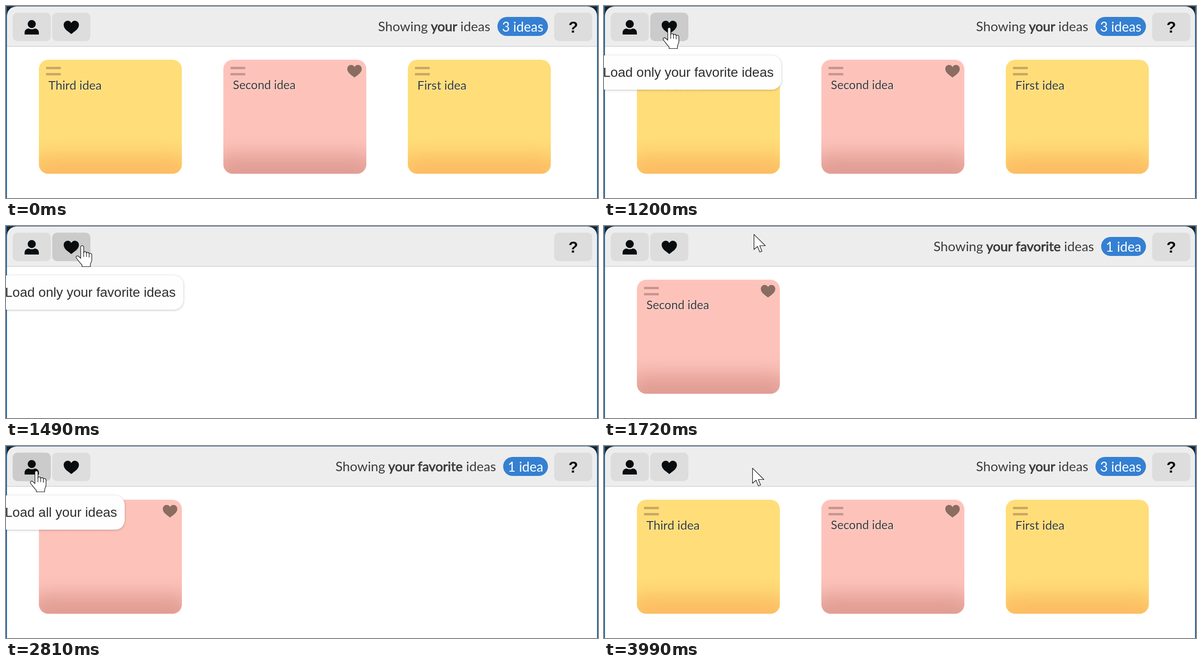
Animation of 1242x404 px, one loop 4.78 s. Source, as an HTML page:

```html
<!DOCTYPE html>
<html lang="en">
<head>
<meta charset="utf-8">
<title>Idea board</title>
<style>
  html, body { margin: 0; width: 100%; height: 100%; overflow: hidden; background: #fff; }
  #stage { position: absolute; left: 0; top: 0; width: 1242px; height: 404px; overflow: hidden;
    background: linear-gradient(#1b252b 0 60px, #fff 60px); font: 28px/40px Lato, sans-serif; color: #3b3b3b; }
  #stage *, #stage *::after { position: absolute; box-sizing: border-box; white-space: pre; }
  #stage b { position: static; }
  #frame, .view { inset: 0; }
  #frame { border: solid #1f6094; border-width: 1px 2px 0; }
  #bar { left: 2px; top: 1px; width: 1238px; height: 85px; background: #ededed;
    border-bottom: 2px solid #dadada; border-radius: 20px 20px 0 0; }
  .button { top: 14px; width: 80px; height: 60px; border-radius: 10px; background: #ddd; }
  .help { left: 1150px; font: bold 33px/62px "Liberation Sans", Arial, sans-serif; text-align: center; color: #080c0e; }
  svg { left: 0; top: 0; overflow: visible; }
  .status { top: 23px; height: 40px; font-size: 27.8px; }
  .status b { font-weight: 400; -webkit-text-stroke: .9px #3b3b3b; }
  .pill { top: 23px; right: 105px; height: 40px; border-radius: 20px; background: #3580d2; color: #fff; text-align: center; }
  .card { top: 113px; width: 300px; height: 240px; border-radius: 20px; overflow: hidden;
    background: var(--paper); font-size: var(--size); }
  .card::after { content: ""; left: -20px; right: -20px; top: 198px; height: 120px; border-radius: 30px;
    background: var(--shade); filter: blur(20px); }
  .yellow { --paper: #ffde79; --shade: #fcbd63; --size: 25.6px; }
  .pink { --paper: #fdc3bb; --shade: #e19d94; --size: 24.8px; }
  .grip { left: 14.5px; top: 15px; width: 31px; height: 18px; border: solid rgba(110, 80, 70, .38); border-width: 5px 0; }
  .title { left: 20px; top: 33px; text-shadow: 1px 1px 1px rgba(255, 255, 255, .6); }
  .tip { left: -40px; top: 104px; height: 72px; padding: 0 16px 0 38px; border-radius: 20px; background: #fefefe;
    box-shadow: 0 1px 5px rgba(0, 0, 0, .25); font: 28px/71px "Liberation Sans", Arial, sans-serif; color: #2f2f2f; }
</style>
</head>
<body>
<div id="stage">
  <div id="bar"></div>
  <div id="frame"></div>
  <div id="userButton" class="button" style="left:14px"></div>
  <div id="heartButton" class="button" style="left:97px"></div>
  <div class="button help">?</div>
  <svg width="1242" height="90" fill="#080c0e">
    <circle cx="54" cy="38" r="8.5"/>
    <path d="M39 60V57C39 50 43 47.500 48 47.500Q54 50.500 60 47.500C65 47.500 69 50 69 57V60Z"/>
    <path class="heart" transform="translate(121 31)"/>
  </svg>
  <div id="allView" class="view"></div>
  <div id="favoriteView" class="view"></div>
  <div id="favoriteTip" class="tip">Load only your favorite ideas</div>
  <div id="allTip" class="tip">Load all your ideas</div>
  <svg id="cursor" width="1" height="1" fill="#fff" stroke="#111" stroke-width="1.2" stroke-linejoin="round">
    <path id="arrow" d="M.6.6V32.500L8 26L13 38L17.500 36L12.800 24.500H24.500Z"/>
    <g id="hand">
      <path d="M-3.300 27V3.500C-3.300-.8 3-.8 3 3.500V15C3.500 13 5 13 5.800 13.200C8 13.200 8.800 14.500 8.800 16
        C9.500 14 14 14 14.400 17.500C15.500 15.500 20 16 20 20V30C20 35 17 37 17 40V44.500H-.5V41
        C-4 38-8 32-12 27C-15 23-10.500 20.500-7.500 23Z"/>
      <path fill="none" d="M3 14V24M8.800 16V24M14.400 17.500V25"/>
    </g>
  </svg>
</div>
<script>
const LOOP = 4780;
const TICK = 78;
const HEART = "M16 28C11.500 24 0 18 0 9C0 3.500 4 0 8.500 0C12 0 15 2 16 5C17 2 20 0 23.500 0C28 0 32 3.500 32 9C32 18 20.500 24 16 28Z";

const MOVES = [
  { start: 90, end: 560, from: [322, 15], to: [137, 45] },
  { start: 1430, end: 1720, from: [160, 41], to: [314, 17] },
  { start: 2030, end: 2490, from: [300, 20], to: [60, 54] },
  { start: 2570, end: 2810, from: [60, 54], to: [64, 52] },
  { start: 3670, end: 3990, from: [113, 52], to: [311, 46] }
];
const [enter, leave, back, , exit] = MOVES;

const el = id => document.getElementById(id);

const card = (column, tone, title) => `<div class="card ${tone}" style="left:${69 + 387 * column}px">
  <div class="grip"></div><div class="title">${title}</div>${tone === "pink"
    ? '<svg width="300" height="60" fill="#8a6c61"><path class="heart" transform="translate(260 11) scale(.95)"/></svg>' : ""}</div>`;

const status = (right, subject, pillWidth, count) =>
  `<div class="status" style="right:${1242 - right}px">Showing <b>${subject}</b> ideas</div>
   <div class="pill" style="width:${pillWidth}px">${count}</div>`;

el("allView").innerHTML = status(1016, "your", 106, "3 ideas") +
  card(0, "yellow", "Third idea") + card(1, "pink", "Second idea") + card(2, "yellow", "First idea");
el("favoriteView").innerHTML = status(1028, "your favorite", 94, "1 idea") + card(0, "pink", "Second idea");
document.querySelectorAll(".heart").forEach(path => path.setAttribute("d", HEART));

// progress from 0 to 1, advancing once per tick
function progress(t, start, end) {
  const steps = Math.round((end - start) / TICK);
  const p = Math.min(1, Math.max(0, (t - start) / (end - start)));
  return Math.floor(p * steps + 1e-6) / steps;
}
const easeOut = p => 1 - (1 - p) ** 2;
const pulse = (t, start, end, away) => progress(t, start, end) - progress(t, away.start, away.end);
const show = (id, on) => el(id).style.display = on ? "" : "none";
const hover = (id, amount) => {
  const grey = Math.round(221 - 18 * amount);
  el(id).style.background = `rgb(${grey},${grey},${grey})`;
};

function movePointer(t) {
  const move = MOVES.findLast(m => m.start <= t);
  show("cursor", move);
  if (!move) return;
  const p = easeOut(progress(t, move.start, move.end));
  const [x, y] = move.from.map((a, i) => a + (move.to[i] - a) * p);
  el("cursor").style.transform = `translate(${x}px,${y}px)`;
  show("hand", x < 178);
  show("arrow", x >= 178);
}

function render(t) {
  movePointer(t);
  el("favoriteTip").style.opacity = pulse(t, 250, enter.end, leave);
  el("allTip").style.opacity = pulse(t, 2190, back.end, exit);
  hover("heartButton", pulse(t, 250, 800, leave));
  hover("userButton", pulse(t, 2190, 2810, exit));
  show("allView", t < 1270 || t >= 3830);
  show("favoriteView", t >= 1510 && t < exit.start);
}

const start = performance.now();
function tick() {
  render((performance.now() - start) % LOOP);
  requestAnimationFrame(tick);
}
tick();
</script>
</body>
</html>
```
